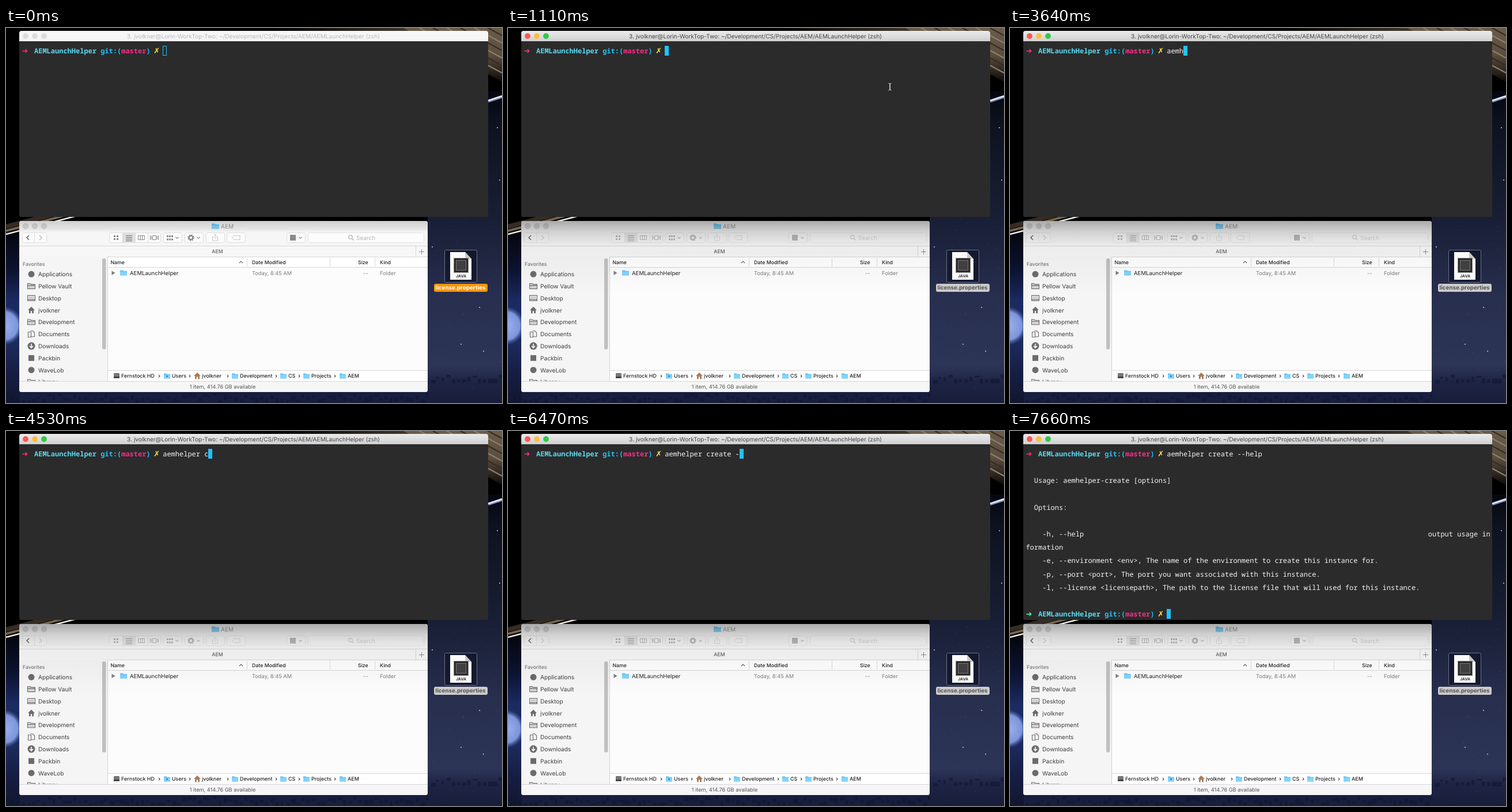
Recreate the animation shown at these times as an HTML page. Size 861 px wide and 651 px high, loop 8000 ms.

```html
<!DOCTYPE html>
<html lang="en">
<head>
<meta charset="utf-8">
<title>Terminal help demo</title>
<style>
  html, body { margin: 0; width: 100%; height: 100%; overflow: hidden; background: #000; }
  svg { display: block; width: 861px; height: 651px; }
  text { font-family: Inter, Roboto, sans-serif; white-space: pre; text-rendering: geometricPrecision; }
  .mono { font-family: "Noto Sans Mono", "DejaVu Sans Mono", monospace; font-size: 12px; }
  .sym { font: 13px "DejaVu Sans", "DejaVu Sans Mono", sans-serif; }
</style>
</head>
<body>
<svg id="stage" viewBox="0 0 861 651" xmlns="http://www.w3.org/2000/svg"></svg>
<script>
const USER = 'jvolkner';
const COMMAND = 'aemhelper create --help';
const LOOP = 8000;
const COL = 7.2, ROW = 23.17, LEFT = 27.4, BASE = 44;

// ---- drawing helpers ----
const rect = (x, y, w, h, fill, more = '') =>
  `<rect x="${x}" y="${y}" width="${w}" height="${h}" fill="${fill}" ${more}/>`;
const circle = (x, y, r, fill, more = '') =>
  `<circle cx="${x}" cy="${y}" r="${r}" fill="${fill}" ${more}/>`;
const line = (d, color, width = 1) =>
  `<path d="${d}" fill="none" stroke="${color}" stroke-width="${width}"/>`;
const shape = (d, fill, more = '') => `<path d="${d}" fill="${fill}" ${more}/>`;
const escape = s => s.replace(/</g, '&lt;').replace(/>/g, '&gt;');
const text = (x, y, s, size, fill, more = '') =>
  `<text x="${x}" y="${y}" font-size="${size}" fill="${fill}" ${more}>${escape(s)}</text>`;
const group = (id, body, more = '') => `<g id="${id}" ${more}>${body}</g>`;
const gradient = (id, y1, y2, stops) =>
  `<linearGradient id="${id}" gradientUnits="userSpaceOnUse" x1="0" x2="0" y1="${y1}" y2="${y2}">` +
  stops.map(([at, c, a = 1]) => `<stop offset="${at}" stop-color="${c}" stop-opacity="${a}"/>`).join('') +
  '</linearGradient>';
const MIDDLE = 'text-anchor="middle"';
const MEDIUM = 'font-weight="500"';

function random(seed) {
  return () => (seed = (seed * 16807) % 2147483647) / 2147483647;
}

// ---- desktop ----
function desktop() {
  const rnd = random(77);
  let out = rect(0, 0, 861, 651, '#000') +
    rect(0, 350, 200, 301, 'url(#leftSky)') +
    rect(732, 110, 129, 541, 'url(#rightSky)') +
    rect(24, 628, 708, 23, '#181e3e') +
    circle(-4, 517, 34, 'url(#glow)');

  // rings, upper right
  out += shape('M690 0H861V94L837 80Z', 'url(#ring)') + rect(460, 0, 401, 5, 'url(#topRing)');
  for (let i = 0; i < 6; i++) {
    const y = 4 + i * 13;
    out += line(`M690 ${y - 84}L837 ${y - 4}L861 ${y + 9}`, i % 2 ? '#8d7f68' : '#352c23', 2.2);
  }
  out += line('M837 127L861 119', '#8c98c4', 5) + line('M837 126L861 118', '#eef2ff', 2.2);

  // rings, lower left
  out += line('M0 345L200 293', '#352c24', 8) + line('M0 352L200 300', '#75664f', 4) +
    line('M0 358L200 306', '#f2eee6', 2.4);

  // skyline texture and stars
  for (let x = 0; x < 861; x += 9)
    out += rect(x, 600 + rnd() * 12 + (x < 732 ? 34 : 0), 4 + rnd() * 5, 3 + rnd() * 6, '#10142e', 'opacity=".55"');
  for (let i = 0; i < 26; i++)
    out += circle(734 + rnd() * 126, 332 + rnd() * 300, .5, '#8d9ac8', 'opacity=".5"');
  for (const [x, y] of [[790, 549], [822, 485], [829, 561], [740, 380], [857, 264], [853, 173]])
    out += circle(x, y, 1.1, '#aebbe6');
  return out;
}

function fileIcon() {
  const label = (id, bg, fg) => group(id,
    rect(743, 444, 93, 14, bg, 'rx="3"') +
    text(789, 454.4, 'license.properties', 9.75, fg, MIDDLE + ' font-weight="700"'));
  return rect(761.5, 385.5, 56, 56, '#0c0f22', 'fill-opacity=".6" stroke="#6d7188" rx="2"') +
    shape('M771 389H797L808 401V437H771Z', '#fafafa') +
    shape('M797 389V401H808Z', '#c9c9c9') +
    rect(777.5, 399.5, 25, 25, '#2a2a2a', 'stroke="#8a8a8a"') +
    rect(781.5, 403.5, 17, 17, '#404040', 'stroke="#777"') +
    text(790, 433, 'JAVA', 6.8, '#333', MIDDLE + ' font-weight="700"') +
    label('labelOn', '#fb9407', '#fff') + label('labelOff', '#cbcbcb', '#555');
}

// ---- file window ----
const folder = (x, y, w = 12) =>
  shape(`M${x} ${y - 4.5}h${w * .4}l1.5 1.3H${x + w}V${y + 4.5}H${x}Z`, '#6cc7f4') +
  rect(x, y - 1.8, w, 6.3, '#83d3fa');
const house = (x, y, color) =>
  shape(`M${x - 6} ${y}L${x} ${y - 6}L${x + 6} ${y}H${x + 4}V${y + 5.5}H${x + 1.2}V${y + 1.5}H${x - 1.2}V${y + 5.5}H${x - 4}V${y}Z`, color);
const button = (x, w, fill = '#fbfbfb') =>
  rect(x + .5, 355.5, w, 17, fill, 'stroke="#dcdcdc" rx="3"');
const chevron = (x, y = 364) => line(`M${x - 2.5} ${y - 1.2}l2.5 2.5l2.5 -2.5`, '#777', 1.1);

function toolbar() {
  const grey = '#8a8a8a';
  let out = button(28, 42) + line('M49.5 356V373', '#dcdcdc') +
    line('M58 360l4 4l-4 4', '#b5b5b5', 1.3) +
    button(179, 89) + rect(203, 356, 21, 17, '#dedede') +
    line('M202.5 356V373M224.5 356V373M246.5 356V373', '#dcdcdc');
  for (const x of [187, 192]) for (const y of [360, 365]) out += rect(x, y, 3, 3, grey);
  out += line('M208 360.5h11M208 363.5h11M208 366.5h11M208 369.5h11', '#666') +
    line('M229.5 360.5h11v7h-11zM233.5 360.5v7M237 360.5v7', grey) +
    line('M254.5 360.5h6v7h-6zM250.5 360v8M252.5 361v6M262.5 361v6M264.5 360v8', grey);
  for (const x of [273, 310, 347, 383, 487]) out += button(x, 32);
  for (let i = 0; i < 3; i++)
    out += rect(279 + i * 4, 360, 3, 3, grey) + rect(279 + i * 4, 365.5, 3, 3, grey);
  out += chevron(297) + chevron(334) + chevron(511) +
    circle(321, 364, 3.4, 'none', `stroke="${grey}" stroke-width="2.4"`) +
    circle(321, 364, 5, 'none', `stroke="${grey}" stroke-width="1.6" stroke-dasharray="2 1.93"`) +
    line('M361 362.5h-2.5v6.5h9v-6.5h-2.5M363 366v-8M360.8 360l2.2 -2.2l2.2 2.2', '#c6c6c6') +
    line('M396 360.5h10v7h-10l-3 -3.5z', '#c6c6c6') +
    rect(493, 359, 10, 10, grey) +
    rect(524.5, 355.5, 201, 17, '#fcfcfc', 'stroke="#e2e2e2" rx="3"') +
    circle(598, 363, 3.2, 'none', 'stroke="#b0b0b0" stroke-width="1.2"') + line('M600.5 365.5l3 3', '#b0b0b0', 1.3) +
    text(608, 367.7, 'Search', 10, '#b6b6b6');
  return group('tools', out) + line('M40 360l-4 4l4 4', '#555', 1.3);
}

function sidebar() {
  const ink = '#6b6b6b';
  const icons = {
    dot: y => circle(44, y, 5.5, ink),
    folder: y => rect(37.5, y - 3.5, 13, 8, '#d4d4d4') +
      line(`M37.5 ${y + 4.5}v-9h4.5l1.5 1.5h7v7.5zM37.5 ${y - 1}h13`, ink, 1.1),
    desk: y => line(`M37.5 ${y - 4.5}h13v9h-13zM37.5 ${y + 2.5}h13`, ink, 1.1) + rect(39, y - 3, 10, 4, '#cfcfcf'),
    home: y => house(44, y, ink),
    docs: y => line(`M38.5 ${y - 3.5}h5v9h-5zM42.5 ${y - 5.5}h4l3 3v7h-5.5`, ink, 1.1),
    down: y => circle(44, y, 6.5, ink) + line(`M44 ${y - 4}v7M41 ${y}l3 3.2l3 -3.2`, '#fff', 1.5),
    square: y => rect(39, y - 5, 10, 10, ink)
  };
  const items = [['dot', 'Applications'], ['folder', 'Pellow Vault'], ['desk', 'Desktop'], ['home', USER],
    ['folder', 'Development'], ['docs', 'Documents'], ['down', 'Downloads'], ['square', 'Packbin'],
    ['dot', 'WaveLob'], ['folder', 'Library']];
  return rect(23, 397, 153, 216, '#f5f5f5') +
    text(29, 412.5, 'Favorites', 8.8, '#777', MEDIUM) +
    `<g clip-path="url(#sideClip)">` + items.map(([icon, name], i) => {
      const y = 427.3 + i * 20.8;
      return icons[icon](y) + text(56, y + 3.8, name, 10.15, '#3d3d3d');
    }).join('') + '</g>' +
    rect(167, 400, 6.5, 158, '#c0c0c0', 'rx="3.2"') +
    line('M176.5 397V613', '#d2d2d2');
}

function pathBar() {
  const steps = [[200, 'Fernstock HD'], [288, 'Users'], [340, USER], [406, 'Development'],
    [490, 'CS'], [530, 'Projects'], [593, 'AEM']];
  const arrows = [266, 319, 385, 469, 509, 571];
  return rect(177, 594, 555, 19, '#fff') + line('M177 594.5H732', '#d6d6d6') +
    steps.map(([x, name], i) => {
      const icon = i === 0 ? rect(187, 599, 10, 9, '#777', 'rx="1.5"') + rect(187, 605, 10, 3, '#444')
        : i === 2 ? house(332, 604, '#a97c5d') : folder(x - 14, 604, 11);
      return icon + text(x, 607.2, name, 8.95, '#222', MEDIUM);
    }).join('') +
    rect(278, 603, 3, 3, '#3a8fc4') +
    arrows.map(x => line(`M${x - 1} 602l2 2.2l-2 2.2`, '#333', 1.1)).join('');
}

function fileWindow() {
  const head = (x, s) => text(x, 409.6, s, 8.75, '#222', MEDIUM);
  return `<g clip-path="url(#fileClip)">` +
    rect(23, 335, 709, 297, '#fcfcfc') + rect(23, 335, 709, 43, '#f6f6f6') +
    [34, 50, 66].map(x => circle(x, 344, 4.8, '#d9d9d9', 'stroke="#c8c8c8" stroke-width=".6"')).join('') +
    folder(357, 344, 13) + text(373, 347.8, 'AEM', 10.1, '#999') +
    toolbar() +
    rect(23, 378, 709, 19, '#f7f7f7') + line('M23 378.5H732M23 397.5H732M711.5 379V397', '#d6d6d6') +
    text(367, 391.2, 'AEM', 8.8, '#444', MIDDLE) + line('M717 388.5h9M721.5 384v9', '#8c8c8c') +
    sidebar() +
    rect(177, 398, 555, 17, '#fff') + line('M177 415.5H732', '#d6d6d6') +
    line('M418.5 399V414M562.5 399V414M640.5 399V414', '#d9d9d9') +
    head(181.5, 'Name') + head(427, 'Date Modified') + head(611, 'Size') + head(649, 'Kind') +
    line('M405 408l3 -3l3 3', '#666', 1.2) +
    shape('M183.5 421.5V429L189.5 425.2Z', '#7d7d7d') + folder(198, 425, 12) +
    text(215, 428.7, 'AEMLaunchHelper', 9.6, '#222') +
    text(427, 428.7, 'Today, 8:45 AM', 9.3, '#7b7b7b') +
    text(620, 428.7, '--', 9.3, '#7b7b7b') + text(649, 428.7, 'Folder', 9.35, '#7b7b7b') +
    pathBar() +
    rect(23, 613, 709, 19, '#f6f6f6') + line('M23 613.5H732', '#d6d6d6') +
    text(376, 625.6, '1 item, 414.76 GB available', 9.2, '#555', MIDDLE) +
    group('softShade', rect(23, 335, 709, 20, 'url(#soft)')) +
    group('deepShade', rect(23, 335, 709, 125, 'url(#deep)')) + '</g>';
}

// ---- terminal ----
const baseline = row => BASE + row * ROW;
const mono = (col, row, s, fill = '#f5f5f5', more = '') =>
  `<text class="mono" x="${LEFT + col * COL}" y="${baseline(row)}" fill="${fill}" ${more}>${escape(s)}</text>`;

function prompt(row, arrow) {
  const y = baseline(row);
  const part = (col, s, fill) => mono(col, row, s, fill, 'font-weight="600"');
  return `<text class="sym" x="${LEFT}" y="${y}" fill="${arrow}">➜</text>` +
    part(3, 'AEMLaunchHelper', '#5cd8ee') + part(19, 'git:(', '#20c3fb') +
    part(24, 'master', '#fc2c88') + part(30, ')', '#20c3fb') +
    `<text class="sym" x="${LEFT + 31.8 * COL}" y="${y}" fill="#ffe83d">✗</text>`;
}

function terminal() {
  const bar = (id, fill, colors) => group(id, rect(23, 5, 814, 18, fill) +
    colors.map((c, i) => circle(34 + i * 16, 14, 4.9, c)).join(''));
  const output = [[2, 2, 'Usage: aemhelper-create [options]'], [2, 4, 'Options:'], [4, 6, '-h, --help'],
    [97, 6, 'output usage in'], [0, 7, 'formation'],
    [4, 8, '-e, --environment <env>, The name of the environment to create this instance for.'],
    [4, 9, '-p, --port <port>, The port you want associated with this instance.'],
    [4, 10, '-l, --license <licensepath>, The path to the license file that will used for this instance.']];
  return `<g clip-path="url(#termClip)">` + rect(23, 5, 814, 323, '#2b2b2b') +
    bar('barOff', '#f6f6f6', ['#dcdcdc', '#dcdcdc', '#dcdcdc']) +
    bar('barOn', 'url(#bar)', ['#fc5753', '#fdbc40', '#33c748']) +
    text(429.5, 17.6, '', 10.15, '#444', MIDDLE + ' id="title"') +
    prompt(0, '#ff2d78') + mono(34, 0, '', '#f5f5f5', 'id="typed"') +
    group('output', output.map(([col, row, s]) => mono(col, row, s)).join('') + prompt(12, '#4ff0a0')) +
    rect(272, 31, 7, 17, '#1fc4ff', 'id="caret"') + '</g>';
}

const pointers =
  group('beam', line('M-2.5 -6q2.5 0 2.5 2v8q0 2 -2.5 2M2.5 -6q-2.5 0 -2.5 2v8q0 2 2.5 2', '#e8e8e8')) +
  group('arrow', shape('M0 0V14L3.3 11L5.6 16.5L8 15.5L5.7 10.2H10.2Z', '#000', 'stroke="#fff"'));

const defs = '<defs>' +
  gradient('leftSky', 355, 651, [[0, '#04060f'], [.22, '#0c1330'], [.4, '#1b2a60'], [.65, '#1c2a5c'],
    [.83, '#161d42'], [1, '#12172f']]) +
  gradient('rightSky', 110, 651, [[0, '#05070f'], [.1, '#0e121f'], [.42, '#191f36'], [.65, '#272e4e'],
    [.88, '#2d3557'], [.93, '#1e2444'], [1, '#181d3a']]) +
  gradient('ring', 0, 94, [[0, '#6a5c49'], [.5, '#5b4e3e'], [.8, '#2c251e'], [1, '#0a0908']]) +
  gradient('bar', 5, 23, [[0, '#ebebeb'], [1, '#d0d0d0']]) +
  gradient('soft', 335, 355, [[0, '#000', .16], [.7, '#000', .07], [1, '#000', 0]]) +
  gradient('deep', 335, 460, [[0, '#000', .31], [.15, '#000', .15], [.34, '#000', .045], [1, '#000', 0]]) +
  '<linearGradient id="topRing"><stop offset="0" stop-color="#6a5c49" stop-opacity="0"/>' +
  '<stop offset="1" stop-color="#6a5c49"/></linearGradient>' +
  '<radialGradient id="glow"><stop offset="0" stop-color="#9db2f0"/><stop offset=".72" stop-color="#7d95da"/>' +
  '<stop offset="1" stop-color="#3f569f" stop-opacity="0"/></radialGradient>' +
  '<clipPath id="termClip"><path d="M23 328V9q0-4 4-4H833q4 0 4 4V325q0 3-3 3H26q-3 0-3-3Z"/></clipPath>' +
  `<clipPath id="fileClip">${rect(23, 335, 709, 297, '#000', 'rx="4"')}</clipPath>` +
  `<clipPath id="sideClip">${rect(23, 415, 150, 198, '#000')}</clipPath></defs>`;

const $ = id => document.getElementById(id);
$('stage').innerHTML = defs + desktop() + fileIcon() + fileWindow() + terminal() + pointers;

// ---- timeline: [time in ms, state] ----
const TYPING = [[0, 0], [2300, 1], [2600, 2], [2750, 3], [3640, 4], [3940, 10], [4530, 11], [4980, 10],
  [5130, 11], [5420, 13], [5570, 14], [5720, 16], [6320, 17], [6470, 18], [6760, 19], [6910, 20],
  [7060, 22], [7210, 23]];
const POINTER = [[0, null], [750, ['arrow', 790, 441]], [960, ['beam', 663, 102]],
  [1260, ['arrow', 764, 345]], [1400, ['arrow', 796, 408]], [2150, null]];
const FOCUS = 1110, RUN = 7510, DONE = 7660;

const current = (table, t) => table.filter(([at]) => at <= t).pop()[1];
const show = (id, on) => $(id).setAttribute('visibility', on ? 'visible' : 'hidden');

function place(focused, col, row) {
  const inset = focused ? 0 : .5;
  const attrs = {
    x: Math.round(LEFT + col * COL) + inset, y: Math.round(31 + row * ROW) + inset,
    width: 7 - 2 * inset, height: 17 - 2 * inset,
    fill: focused ? '#1fc4ff' : 'none', stroke: focused ? 'none' : '#1fc4ff'
  };
  for (const key in attrs) $('caret').setAttribute(key, attrs[key]);
}

function render(t) {
  const focused = t >= FOCUS, running = t >= RUN && t < DONE, done = t >= DONE;
  const typed = current(TYPING, t);
  show('barOn', focused);
  show('barOff', !focused);
  show('deepShade', focused);
  show('softShade', !focused);
  show('labelOn', !focused);
  show('labelOff', focused);
  show('output', done);
  $('tools').setAttribute('opacity', focused ? .55 : 1);
  $('title').setAttribute('fill', focused ? '#444' : '#b9b9b9');
  $('title').textContent =
    `3. ${USER}@Lorin-WorkTop-Two: ~/Development/CS/Projects/AEM/AEMLaunchHelper (${running ? 'node' : 'zsh'})`;
  $('typed').textContent = COMMAND.slice(0, typed);
  if (done) place(true, 34, 12);
  else if (running) place(true, 0, 1);
  else place(focused, 34 + typed, 0);

  const pointer = current(POINTER, t);
  for (const id of ['beam', 'arrow']) {
    const on = pointer && pointer[0] === id;
    show(id, on);
    if (on) $(id).setAttribute('transform', `translate(${pointer[1]} ${pointer[2]})`);
  }
}

const start = performance.now();
function tick() {
  render((performance.now() - start) % LOOP);
  requestAnimationFrame(tick);
}
tick();
</script>
</body>
</html>
```
